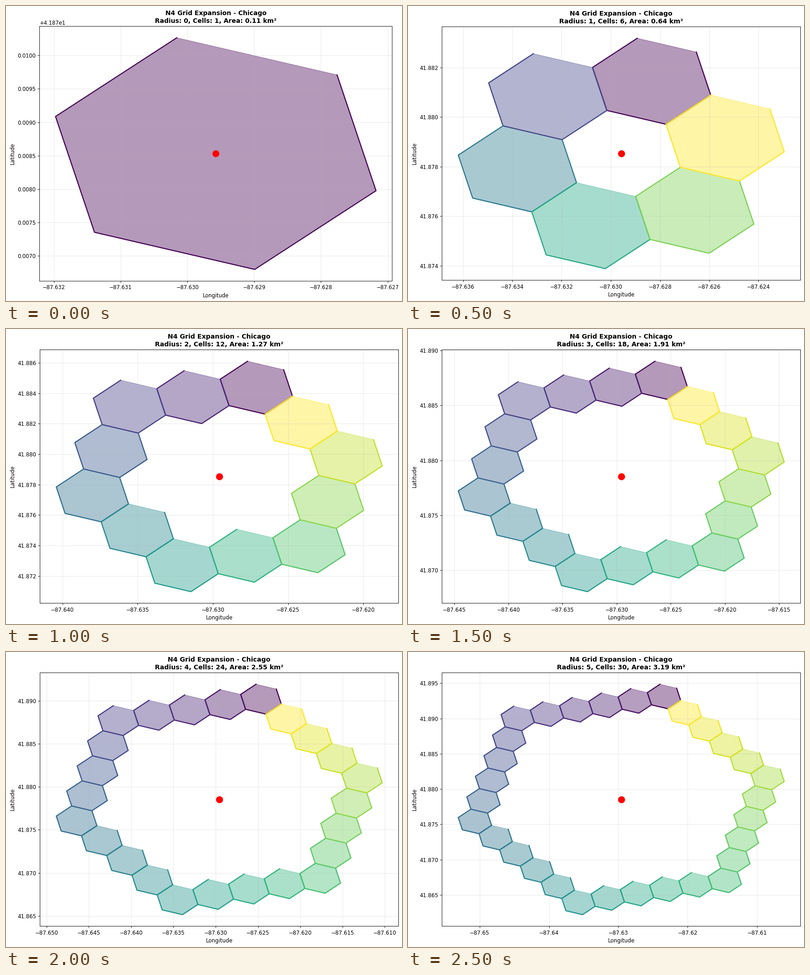
Animation of 867x646 px, one loop 3 s. Source, as a matplotlib script:

```python
import numpy as np
import matplotlib.pyplot as plt
from matplotlib.animation import FuncAnimation

W, H, DPI = 867, 646, 72
CENTER = np.array([-87.629575, 41.87853])
CELL_AREA = 0.1062

# Half-diagonals of one cell in degrees; a hexagon needs only two of them
A = np.array([-0.000584, 0.001736])
C = np.array([0.0024012, -0.0005565])
B = A + C
OUTLINE = np.array([B, C, -A, -B, -C, A])
CORNERS = np.array([A + B, A - C, -B - C, -A - B, C - A, B + C])

# Base sizes in points, scaled together with the text
SIZES = {
    "font.size": 10,
    "axes.linewidth": 0.8,
    "axes.labelpad": 4,
    "axes.titlepad": 6,
    "grid.linewidth": 0.8,
    "patch.linewidth": 1,
    "lines.linewidth": 2,
    "lines.markersize": 12,
    "lines.markeredgewidth": 1,
}
for axis in ("xtick", "ytick"):
    SIZES[f"{axis}.major.size"] = 3.5
    SIZES[f"{axis}.major.pad"] = 3.5
    SIZES[f"{axis}.major.width"] = 0.8

plt.rcParams["font.family"] = "DejaVu Sans"
fig = plt.figure(figsize=(W / DPI, H / DPI), dpi=DPI, facecolor="white")


def ring(radius):
    """Cell centres at the given distance, counterclockwise."""
    if radius == 0:
        return [CENTER]
    steps = np.roll(CORNERS, -1, axis=0) - CORNERS
    return [CENTER + radius * corner + j * step
            for corner, step in zip(CORNERS, steps)
            for j in range(radius)]


def add_axes(left, right, top, bottom):
    return fig.add_axes([left / W, 1 - bottom / H,
                         (right - left) / W, (bottom - top) / H])


def draw(radius):
    scale = 1.153 if radius == 0 else 1.172
    plt.rcParams.update({key: size * scale for key, size in SIZES.items()})
    fig.clear()
    if radius == 0:
        ax = add_axes(73.3, 845.2, 44.2, 602.2)
    else:
        ax = add_axes(74.4, 859.4, 45.4, 600.4)

    cells = ring(radius)
    colors = plt.cm.viridis(np.linspace(0, 1, len(cells)))
    for cell, color in zip(cells, colors):
        x, y = (cell + OUTLINE).T
        ax.fill(x, y, color=color, alpha=0.4)
        ax.plot(x, y, color=color)
    ax.plot(*CENTER, "ro")

    ax.set_xlabel("Longitude")
    ax.set_ylabel("Latitude")
    ax.set_title(
        "N4 Grid Expansion - Chicago\n"
        f"Radius: {radius}, Cells: {len(cells)}, "
        f"Area: {len(cells) * CELL_AREA:.2f} km²",
        fontsize=12 * scale, fontweight="bold", linespacing=1.3)
    ax.grid(True, alpha=0.3)
    return []


anim = FuncAnimation(fig, draw, frames=6, interval=500,
                     init_func=lambda: [], repeat=True, repeat_delay=0)
plt.show()
```
